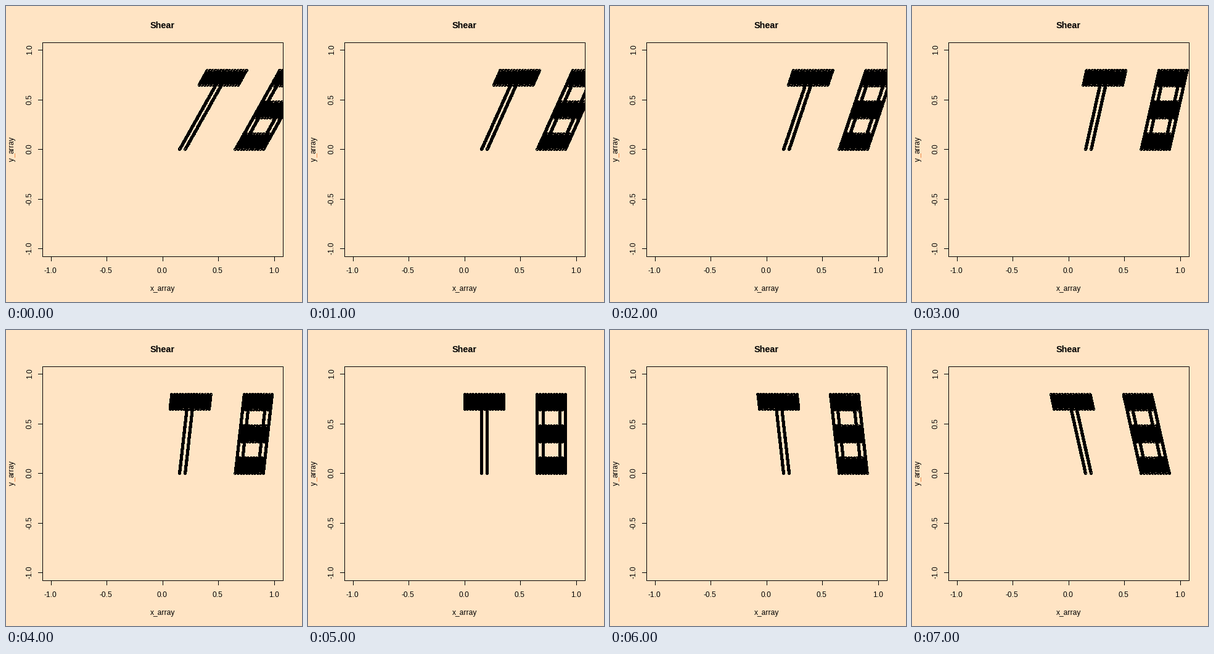
Recreate the animation shown at these times as a matplotlib script. Size 480 by 480 pixels, loop 8 s.

```python
import numpy as np
import matplotlib.pyplot as plt
from matplotlib.animation import FuncAnimation
from matplotlib.collections import PolyCollection
from matplotlib.patches import Rectangle

SIZE = 480
BISQUE = "#ffe4c4"
LEFT, RIGHT, TOP, BOTTOM = 59, 449, 59, 406
CX, CY = 254.4, 232.8          # pixel position of the data origin
SX, SY = 180.889, 160.889      # pixels per data unit

plt.rcParams["font.family"] = "Liberation Sans"
fig = plt.figure(figsize=(SIZE / 72, SIZE / 72), dpi=72, facecolor=BISQUE)
ax = fig.add_axes([0, 0, 1, 1])
ax.set(xlim=(0, SIZE), ylim=(SIZE, 0))
ax.axis("off")


def to_pixel(x, y):
    """Whole-pixel device position of a data point."""
    return np.floor(CX + SX * x), np.floor(CY - SY * y)


def block(xs, y0, y1):
    """Points on the columns xs, filling y0..y1 in steps of 0.005."""
    ys = np.arange(round(y0 * 200), round(y1 * 200) + 1) / 200
    return np.array([(x, y) for x in xs for y in ys])


def line(xs, ys, color="black"):
    ax.plot(np.array(xs) + 0.5, np.array(ys) + 0.5, color=color, lw=1,
            antialiased=False, snap=False, solid_joinstyle="miter", zorder=3)


def label(x, y, text, size=12, **kw):
    ax.text(x, y, text, size=size, ha="center", va="baseline",
            rotation_mode="anchor", **kw)


def rect(x, y, w, h):
    return [(x, y), (x + w, y), (x + w, y + h), (x, y + h)]


# Letters: a "T" and an "8" built from columns of dots
t_bar = np.linspace(0, 0.35, 15)
eight_bar = np.linspace(0.65, 0.90, 11)
eight_sides = [0.65, 0.70, 0.85, 0.90]
points = np.vstack([
    block(t_bar, 0.65, 0.80),
    block([0.15, 0.20], 0, 0.65),
    block(eight_bar, 0, 0.16),
    block(eight_bar, 0.32, 0.48),
    block(eight_bar, 0.64, 0.80),
    block(eight_sides, 0, 0.80),
])

# Small open circle, five pixels across: top, bottom, left and right strokes
ring = np.array([rect(-1, -2, 3, 1), rect(-1, 2, 3, 1),
                 rect(-2, -1, 1, 3), rect(2, -1, 1, 3)])
dots = PolyCollection([], facecolors="black", edgecolors="none",
                      linewidths=0, antialiaseds=False, snap=False, zorder=2)
ax.add_collection(dots, autolim=False)
dots.set_clip_path(Rectangle((LEFT, TOP), RIGHT - LEFT + 1, BOTTOM - TOP + 1,
                             transform=ax.transData))

# Frame, ticks and text
line([LEFT, RIGHT, RIGHT, LEFT, LEFT], [TOP, TOP, BOTTOM, BOTTOM, TOP])
for v in np.linspace(-1, 1, 5):
    px, py = to_pixel(v, v)
    line([px, px], [BOTTOM, BOTTOM + 7])
    line([LEFT - 7, LEFT], [py, py])
    label(px - 0.7, 433, f"{v:.1f}")
    label(42, py - 0.4, f"{v:.1f}", rotation=90)

label(254, 36, "Shear", size=14.4, weight="bold")
label(254.2, 462, "x_array")
label(13, 248.6, "y", rotation=90)
label(13, 225.2, "array", rotation=90)
line([14, 14], [239, 245], color="#f08c46")


def update(i):
    shear = (5 - i) / 10
    x, y = points.T
    centers = np.column_stack(to_pixel(x + shear * y, y))
    centers = np.unique(centers, axis=0)
    dots.set_verts((centers[:, None, None] + ring).reshape(-1, 4, 2))
    return [dots]


anim = FuncAnimation(fig, update, frames=8, interval=1000, repeat=True,
                     repeat_delay=0)
plt.show()
```
